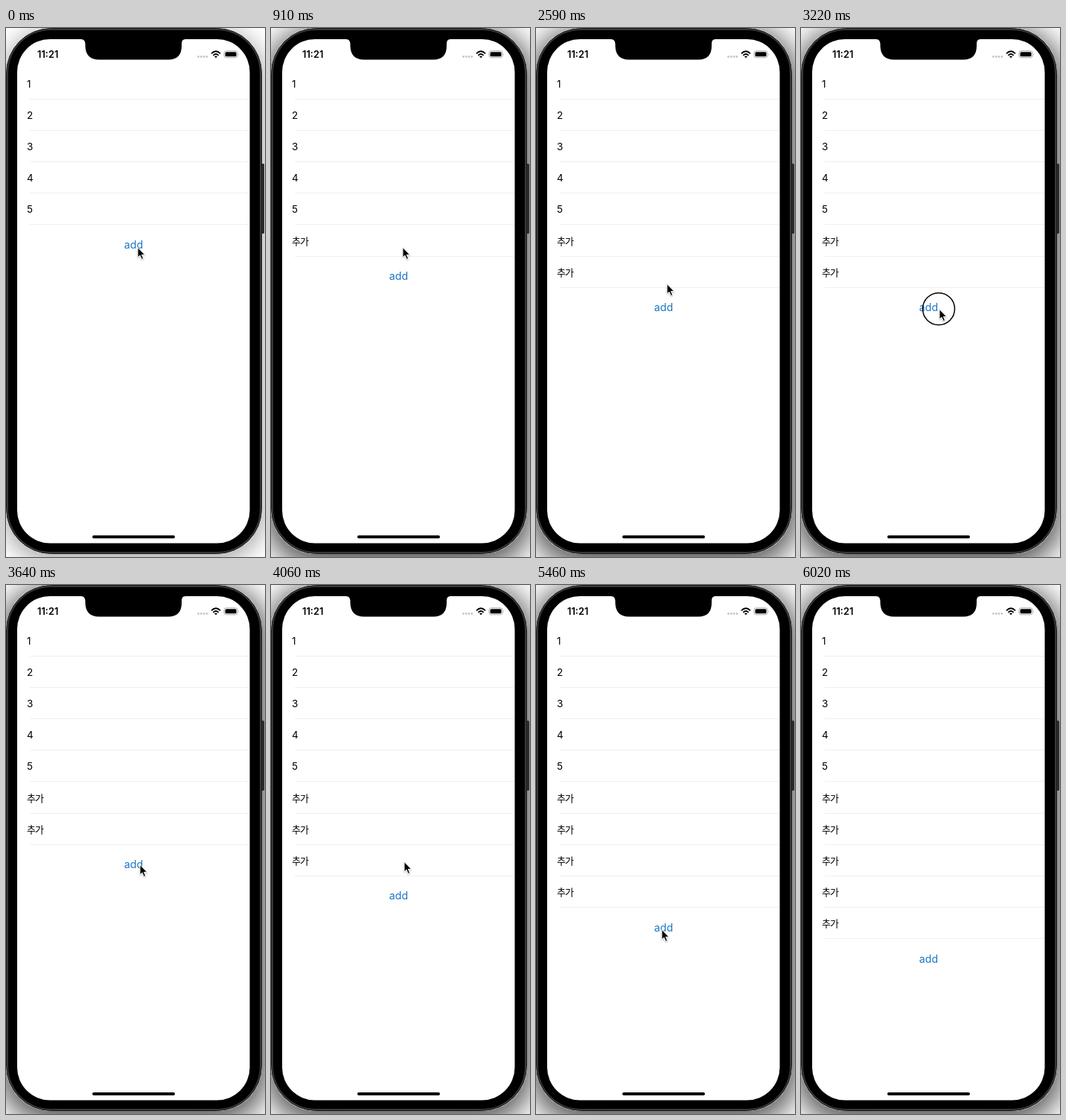
An HTML page that plays this animation: 348x710 px, repeating every 6.09 s.

```html
<!DOCTYPE html>
<html lang="ko">
<head>
<meta charset="utf-8">
<style>
html, body { margin: 0; width: 100%; height: 100%; overflow: hidden; background: #fff; }
#phone { position: absolute; width: 344px; height: 706px; border-radius: 60px; }
svg { position: absolute; left: 0; top: 0; }
text { font: 13.5px Inter, "Noto Sans CJK KR", "Noto Sans CJK", sans-serif; }
.time { font-size: 12.8px; font-weight: 600; }
.hangul { font-size: 13px; letter-spacing: -1px; }
#add { font-size: 14.2px; text-anchor: middle; }
#arrow { stroke: #fff; stroke-linejoin: round; filter: drop-shadow(0 1px 1px #0004); }
</style>
</head>
<body>
<div id="phone"></div>
<svg width="348" height="710">
  <!-- Phone body and screen -->
  <rect x="343" y="182" width="4" height="94" rx="1.5" fill="#2b2b2b"/>
  <rect x=".5" y=".5" width="343" height="705" rx="60" fill="#383838" stroke="#1c1c1c"/>
  <rect x="3" y="3" width="338" height="700" rx="57"/>
  <rect x="15" y="15" width="312.500" height="676.500" rx="44" fill="#fff"/>
  <path d="M101 14v1q5 0 5.500 6v3q.5 18.500 18.500 18.500h93q18 0 18-18.500v-3q0-6 5-6v-1z"/>
  <rect x="116" y="681" width="111" height="4" rx="2"/>

  <!-- Status bar -->
  <text class="time" x="42" y="40">11:21</text>
  <path d="M258.500 38.500h12" stroke="#c4c4c4" stroke-width="2.800" stroke-linecap="round" stroke-dasharray="0 3.750"/>
  <path d="M276 34.300q6-6 12 0M278.400 36.800q3.600-3.600 7.200 0" fill="none" stroke="#000" stroke-width="1.800"/>
  <path d="M282 40.300l-2-2q2-1.500 4 0z"/>
  <rect x="293" y="30.800" width="18" height="9" rx="2.800" fill="none" stroke="#aaa"/>
  <rect x="294.500" y="32.300" width="15" height="6" rx="1.500"/>
  <path d="M312.300 34v3q1.200-1.500 0-3" fill="#999"/>

  <g id="list"></g>
  <text id="add" x="171.500">add</text>
  <g id="pointer">
    <circle id="ring" cx="-1" r="21.500" fill="none" stroke="#000" stroke-width="1.500"/>
    <path id="arrow" d="M0 .5v13.500l3-2.800 2.300 5.200 2.300-1-2.200-5h4.300z"/>
  </g>
</svg>
<script>
const LOOP = 6090, STEP = 70, PITCH = 42.2, START_ROWS = 5;
const $ = id => document.getElementById(id);
const show = (el, on) => el.style.display = on ? "" : "none";

const glides = [], presses = [];
const glide = (from, to, x, y) => glides.push({ from, to, x, y });
const press = (down, up, hit = true) => presses.push({ down, up, hit });

glide(0, 1, 177, 294);
press(770, 910);
glide(1470, 2030, 182, 333);
press(2240, 2310);
glide(2450, 2800, 165, 360);
glide(2800, 3080, 186, 377);
press(3150, 3290, false);
glide(3220, 3430, 183, 397);
glide(3430, 3710, 179, 371);
press(3850, 3920);
glide(4060, 4200, 171, 430);
glide(4340, 4830, 168, 421);
press(4830, 4970);
glide(5040, 5250, 169, 478);
glide(5250, 5460, 169, 462);
press(5600, 5670);
glide(5740, 6020, 169, 640);

const clamp = v => Math.min(1, Math.max(0, v));
const ease = k => k * k * (3 - 2 * k);

// Each glide pulls the pointer from wherever the earlier ones left it.
function pointerAt(t) {
  let { x, y } = glides[0];
  for (const g of glides) {
    const k = ease(clamp((t - g.from) / (g.to - g.from)));
    x += (g.x - x) * k;
    y += (g.y - y) * k;
  }
  return [Math.round(x), Math.round(y)];
}

const rowCount = START_ROWS + presses.filter(p => p.hit).length;
for (let i = 0; i < rowCount; i++) {
  const y = i * PITCH, added = i >= START_ROWS;
  $("list").innerHTML += `<g>
    <text x="28" y="${79.6 + y}" class="${added ? "hangul" : ""}">${added ? "추가" : i + 1}</text>
    <path d="M32 ${Math.floor(95 + y) + 0.5}H327" stroke="#efefef"/></g>`;
}

function draw(now) {
  const t = Math.floor((now % LOOP) / STEP) * STEP;
  const added = presses.filter(p => p.hit && t >= p.up).length;
  const held = presses.find(p => t >= p.down && t < p.up);
  const lit = held && held.hit && t > held.down;

  [...$("list").children].forEach((row, i) => show(row, i < START_ROWS + added));
  $("add").setAttribute("y", 295.7 + added * PITCH);
  $("add").setAttribute("fill", lit ? "#1a109c" : "#1b74c4");
  $("pointer").setAttribute("transform", `translate(${pointerAt(t)})`);
  show($("pointer"), t < 6020);
  show($("ring"), held);

  // The first press brings the window to the front and deepens its shadow.
  const active = t >= presses[0].down;
  $("phone").style.boxShadow = active ? "0 8px 36px 8px #000a" : "0 6px 30px 4px #0005";
}

const start = performance.now();
(function tick() {
  draw(performance.now() - start);
  requestAnimationFrame(tick);
})();
</script>
</body>
</html>
```
